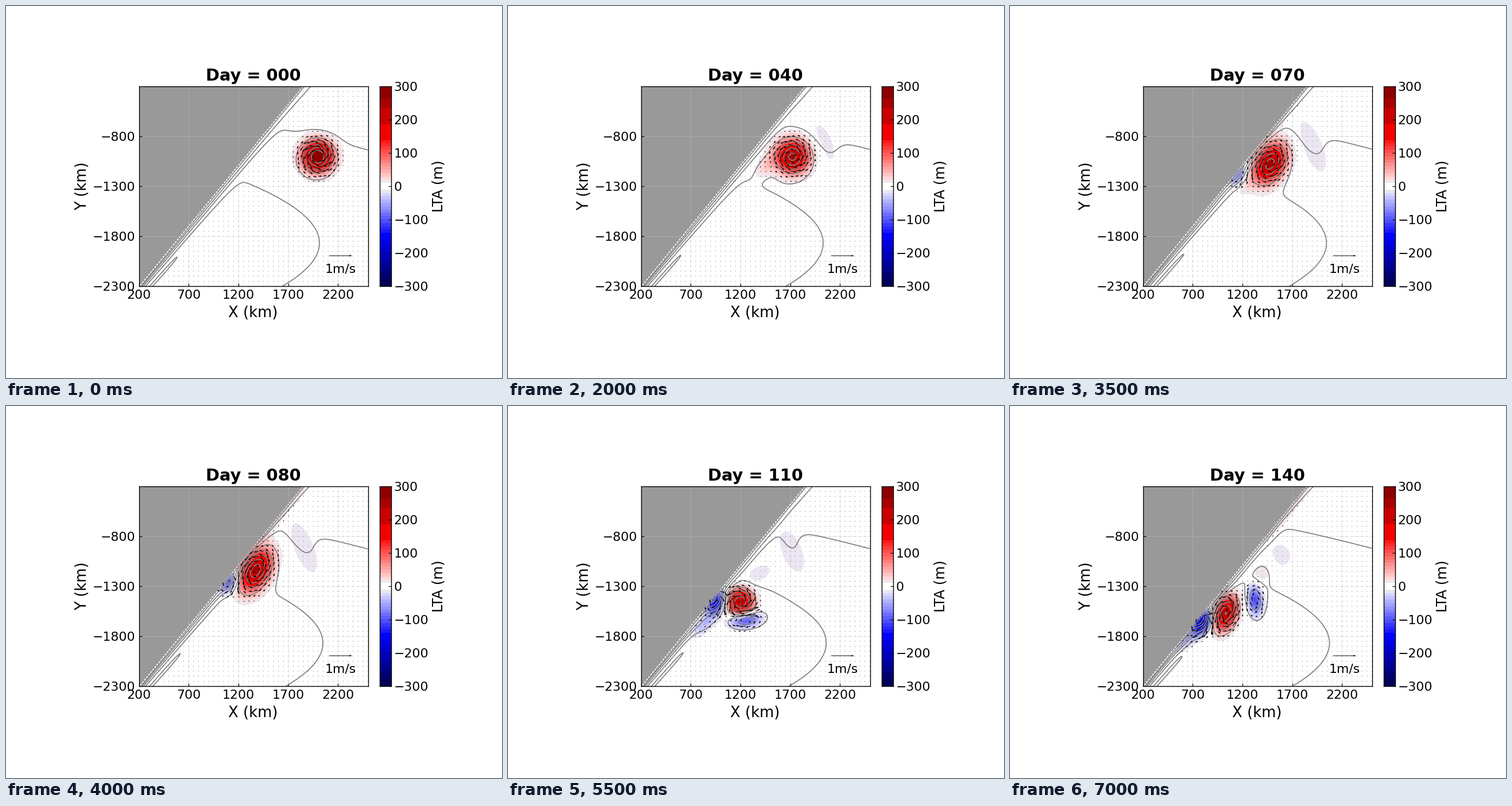
Write a matplotlib script that moves like this. It is 864 px wide and 648 px high and loops after 7500 ms.

```python
import numpy as np
import matplotlib.pyplot as plt
from matplotlib.animation import FuncAnimation

W, H = 864, 648
L, R, T, B = 231.5, 630.5, 140, 488
FRAMES, INTERVAL, DAYS = 15, 500, 10
STEP = 52  # anomaly in metres between two height contours


def px(x_km):
    return L + (x_km - 200) / 2300 * (R - L)


def py(y_km):
    return T + (-300 - y_km) / 2000 * (B - T)


def coast(y):
    return 232.5 + (488 - y) * 0.8185


def ramp(v, a, b):
    return np.clip((v - a) / (b - a), 0, 1)


def blob(x, y, cx, cy, amp, a, b, tilt):
    """Tilted elliptic bump; tilt in degrees, counterclockwise."""
    c, s = np.cos(np.radians(tilt)), np.sin(np.radians(tilt))
    dx, dy = x - cx, cy - y
    u, v = (dx * c + dy * s) / a, (dy * c - dx * s) / b
    return amp * np.exp(-(u * u + v * v) / 2)


def eddy(x, y, day):
    """The warm eddy: drifts to the shore, then slides along it and pulses."""
    days = [0, 60, 80, 110, 140]
    cx = np.interp(day, days, [543, 472, 435, 405, 376])
    cy = np.interp(day, days, [262, 262, 286, 341, 361])
    size = np.interp(day, days, [17.4, 19.2, 20, 14.3, 15.2])
    stretch = np.sqrt(1 + 0.65 * pulse(day))
    amp = 242 + 53 * np.exp(-day / 20)
    return blob(x, y, cx, cy, amp, size * stretch, size / stretch, 50 + 0.15 * day)


def pulse(day):
    return np.sin(np.pi * (day - 50) / 60) ** 2 if day > 50 else 0


def anomaly(x, y, day):
    total = eddy(x, y, day)
    # streamer on the shore side
    t = day - 40
    total += blob(x, y, 452 - 1.4 * t, 276 + 1.05 * t,
                  48 * np.exp(-((day - 54) / 20) ** 2), 18, 10, 50)
    # pale wake behind the eddy
    total += blob(x, y, 551 - 0.8 * t, 238 + 0.22 * t, -18 * ramp(day, 20, 45),
                  43 - (t / 14 - 2.1) ** 2, 16, 112)
    # cold lobes: at the shore, trailing along it, and circling the eddy
    t = day - 80
    total += blob(x, y, 390 - 0.92 * t, 308 + 1.15 * t,
                  -205 * np.sqrt(ramp(day, 60, 140)), 14.5, 9.5, 58)
    total += blob(x, y, 374 - 1.07 * t, 354 + 0.87 * t, -40 * ramp(day, 80, 110), 20, 9, 43)
    t = day - 110
    total += blob(x, y, 414 + 0.43 * t, 373 - 1.17 * t, -105 * ramp(day, 80, 110),
                  18, 9, 8 + 2.9 * t)
    # weak patch that changes sign, and the warm strip on the northern shore
    if day > 95:
        total += blob(x, y, 437, 292, -17 * np.cos(np.pi * t / 30), 20, 12, 30 + t)
    total += blob(x, y, 478, 193, 19 * pulse(day), 60, 6, 51)
    return np.clip(total, -299, 299)


def height(x, y, day):
    """Surface height in contour steps: gyre times coastal jet, plus anomaly."""
    e = (x - 546 - 0.075 * day + 0.0115 * (y - 413) ** 2) / 387
    gyre = 3 - np.where(e < 1, e, 1 + np.tanh(e - 1))
    d = np.maximum(x - coast(y), 0)
    width = 12 - 4 * ((y - 300) / 188) ** 2
    jet = 1 - np.exp(-(d / width) ** 1.7)
    axis = 20 + 0.07 * (488 - y)
    tongue = 0.55 / (1 + np.exp((425 - 0.06 * day - y) / 10))
    tongue = tongue * np.exp(-((d - axis) / 4.2) ** 2 / 2)
    return gyre * jet + tongue + anomaly(x, y, day) / STEP


def current(day):
    gx = anomaly(qx + 1, qy, day) - anomaly(qx - 1, qy, day)
    gy = anomaly(qx, qy + 1, day) - anomaly(qx, qy - 1, day)
    return -0.02 * gy, -0.02 * gx


# Colour bands
levels = np.r_[np.arange(-300, -139, 20), np.arange(-130, 0, 10),
               np.arange(10, 131, 10), 138, 186, 234, 264, 300].astype(float)
middle = (levels[:-1] + levels[1:]) / 2
bands = plt.get_cmap("seismic")((middle + 300) / 600)
bands[np.abs(middle) < 1] = 1
bands[middle == 15, :3] = (0.945, 0.902, 0.925)
bands[middle == -15, :3] = (0.922, 0.902, 0.949)

fig = plt.figure(figsize=(W / 72, H / 72), dpi=72, facecolor="white")


def panel(x0, x1):
    ax = fig.add_axes([x0 / W, 1 - B / H, (x1 - x0) / W, (B - T) / H])
    for side in ax.spines.values():
        side.set_linewidth(1.4)
    return ax


def label(x, y, text, size, **kw):
    return fig.text(x / W, 1 - y / H, text, size=size, ha="center", va="baseline",
                    rotation_mode="anchor", **kw)


def minus(v):
    return str(v).replace("-", "\u2212")


ax = panel(L, R)
ax.set_xlim(L, R)
ax.set_ylim(B, T)
xt, yt = range(200, 2201, 500), range(-2300, -799, 500)
ax.set_xticks([px(v) for v in xt], [minus(v) for v in xt])
ax.set_yticks([py(v) for v in yt], [minus(v) for v in yt])
ax.tick_params(direction="in", labelsize=22, pad=6, length=5, width=1.2)
ax.grid(ls=":", lw=1, color="0.78")

bar = panel(650.5, 670.5)
bar.barh(levels[:-1], 1.4, np.diff(levels), left=-0.2, align="edge", color=bands,
         antialiased=False)
bar.set_xlim(0, 1)
bar.set_ylim(-300, 300)
bar.set_xticks([])
bar.yaxis.tick_right()
bt = range(-300, 301, 100)
bar.set_yticks(bt, [minus(v) for v in bt])
bar.tick_params(direction="in", labelsize=22, pad=5, length=5, width=1.2)

title = label(431, 130, "Day = 000", 28.9, weight="bold")
label(430.5, 542, "X (km)", 25.9)
label(140, 314, "Y (km)", 25.9, rotation=90)
label(761, 314, "LTA (m)", 24.4, rotation=90)
label(583, 465, "1m/s", 22)

# Land with a stepped shore
ys = np.arange(T - 4, B + 5, 4.35)
ax.fill(np.r_[L - 5, np.repeat(coast(ys) + 1.8, 2)[1:], L - 5],
        np.r_[T - 4, np.repeat(ys, 2)[:-1], B + 5], color="0.6", lw=0, zorder=1.3)
shore = np.array([T, B])
ax.plot(coast(shore) + 2.5, shore, color="0.5", lw=1.5)

fx, fy = np.meshgrid(np.arange(L, R + 1.5, 1.5), np.arange(T, B + 1.5, 1.5))
on_land = fx < coast(fy) + 2

qx, qy = np.meshgrid(px(np.arange(200, 2501, 50)), py(np.arange(-2300, -299, 50)))
sea = qx > coast(qy) + 2
qx, qy = qx[sea], qy[sea]
arrow = dict(scale=10, width=0.0024, color="k", zorder=3)
arrows = ax.quiver(qx, qy, *current(0), **arrow)
ax.quiver([563], [435], [1], [0], **arrow)

shapes = []


def draw(i):
    day = i * DAYS
    title.set_text(f"Day = {day:03d}")
    while shapes:
        shapes.pop().remove()
    shapes.append(ax.contourf(fx, fy, anomaly(fx, fy, day), levels=levels,
                              colors=bands, zorder=1))
    shapes.append(ax.contour(fx, fy, np.ma.array(height(fx, fy, day), mask=on_land),
                             levels=range(-4, 10), colors="0.5", linewidths=1.7,
                             linestyles="solid", zorder=2))
    arrows.set_UVC(*current(day))
    return []


anim = FuncAnimation(fig, draw, frames=FRAMES, interval=INTERVAL, repeat=True,
                     repeat_delay=0, blit=False)
plt.show()
```
